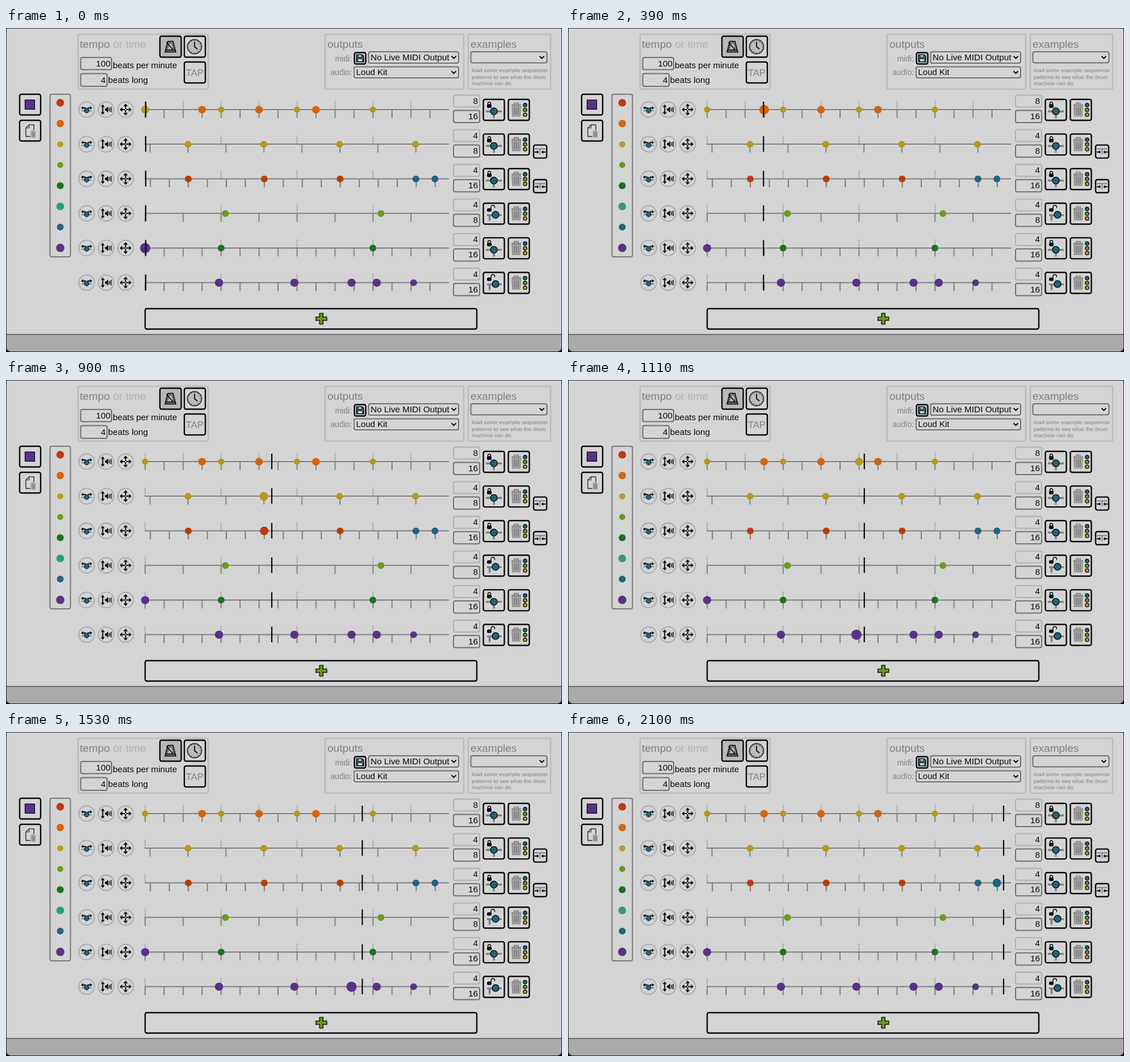
An HTML page for the animation above (2.13 s loop, 979 by 572 pixels).

```html
<!DOCTYPE html>
<html lang="en">
<head>
<meta charset="utf-8">
<title>Drum sequencer</title>
<style>
html, body { margin: 0; width: 100%; height: 100%; overflow: hidden; background: #000; }
svg { display: block; width: 979px; height: 572px; font-family: "Liberation Sans", Arial, sans-serif; }
</style>
</head>
<body>
<svg id="stage" viewBox="0 0 979 572"></svg>
<script>
const BG = '#d4d4d4', GREY = '#808080', PALE = '#b1b1b1', INK = '#080808';
const RED = '#bd3a0f', ORANGE = '#d2650f', YELLOW = '#b8971b', LIME = '#6a9a23',
      GREEN = '#1f6f25', TEAL = '#2a9b80', BLUE = '#1f667f', PURPLE = '#573289';

const LEFT = 245, WIDTH = 535;
const STEP = 30, LOOP = 2130;

const rowY = i => 144 + 61.1 * i;

// beats, divisions, tick offset, locked, notes as [x, colour, radius]
const rows = [
  { beats: 8, div: 16, shift: 0, locked: true, notes: [
    [245, YELLOW, 5.5], [345.3, ORANGE, 6.8], [378.8, YELLOW, 5.5], [445.5, ORANGE, 6.8],
    [512.4, YELLOW, 5.5], [545.7, ORANGE, 6.8], [646, YELLOW, 5.5]] },
  { beats: 4, div: 8, shift: 8.6, locked: true, snap: true, notes: [
    [320.4, YELLOW, 6], [453.9, YELLOW, 6], [587.4, YELLOW, 6], [721, YELLOW, 6]] },
  { beats: 4, div: 16, shift: 9.2, locked: true, snap: true, notes: [
    [321, RED, 6], [454.7, RED, 6], [588.3, RED, 6], [721.8, BLUE, 6], [755.2, BLUE, 6]] },
  { beats: 4, div: 8, shift: 0, locked: false, notes: [[386.4, LIME, 6], [660.2, LIME, 6]] },
  { beats: 4, div: 16, shift: 0, locked: true, notes: [
    [245, PURPLE, 7.2], [378.8, GREEN, 6], [646, GREEN, 6]] },
  { beats: 4, div: 16, shift: 0, locked: false, notes: [
    [375, PURPLE, 7.2], [507.8, PURPLE, 7.2], [608.4, PURPLE, 7.2], [652.8, PURPLE, 7.2], [717.7, PURPLE, 6]] }
];

const line = (x1, y1, x2, y2, color = GREY, w = 2) =>
  `<path d="M${x1} ${y1}L${x2} ${y2}" stroke="${color}" stroke-width="${w}"/>`;
const path = (d, fill = 'none', stroke = 'none', w = 1) =>
  `<path d="${d}" fill="${fill}" stroke="${stroke}" stroke-width="${w}"/>`;
const dot = (x, y, r, fill, stroke = 'none', w = 1) =>
  `<circle cx="${x}" cy="${y}" r="${r}" fill="${fill}" stroke="${stroke}" stroke-width="${w}"/>`;
const box = (x1, y1, x2, y2, stroke, w = 2, r = 3, fill = 'none') =>
  `<rect x="${x1}" y="${y1}" width="${x2 - x1}" height="${y2 - y1}" rx="${r}" fill="${fill}" stroke="${stroke}" stroke-width="${w}"/>`;
const text = (x, y, size, str, fill = INK, anchor = 'start') =>
  `<text x="${x}" y="${y}" font-size="${size}" fill="${fill}" text-anchor="${anchor}">${str}</text>`;
const at = (x, y, body, scale = 1) => `<g transform="translate(${x} ${y}) scale(${scale})">${body}</g>`;
const button = (x1, y1, x2, y2, fill = BG) => box(x1, y1, x2, y2, INK, 2.4, 3, fill);
const chevron = (x, y) => path(`M${x - 4} ${y - 2.3}l4 4 4-4`, 'none', INK, 2);

function trash() {
  return path('M-8.5-8.5h17M-3.5-9v-2.5h7v2.5', 'none', '#888', 2) +
    path('M-7.5-6.5h15l-1 18h-13z', '#aaa', '#888', 1.6) +
    path('M-3.5-4l.4 13M0-4v13M3.5-4l-.4 13', 'none', '#777', 1.7);
}

function slideIcon() {
  return line(-9.5, 2.2, 9.5, 2.2, GREY, 1.8) + dot(0, 1.6, 4.3, BLUE, INK, .9) +
    path('M-10-3l4-3v2h4v2h-4v2zM10-3l-4-3v2h-4v2h4v2z', INK);
}

function volumeIcon() {
  return path('M-6-9l3.5 4.5h-2.5v9h2.5l-3.5 4.5-3.5-4.5h2.5v-9h-2.5z', INK) +
    path('M-2-2h2l3.5-3.5v11l-3.5-3.5h-2z', INK) +
    path('M5.2-3v6M7.3-4v8M9.4-5v10', 'none', INK, 1.1);
}

function moveIcon() {
  const arrow = path('M-1-1v-5h-3l4-4.5 4 4.5h-3v5z', INK);
  return [0, 90, 180, 270].map(a => `<g transform="rotate(${a})">${arrow}</g>`).join('');
}

function lockIcon(locked) {
  if (!locked) {
    return path('M-12 3.2h10M-7.5 3.2v10', 'none', GREY, 3.4) + line(4, 3, 14, 3, GREY, 3) +
      dot(3, 2.5, 6, BLUE, INK, 1.4) +
      box(-12, -9, -4, -3, INK, 0, 2.6, INK) +
      path('M-5-8v-2.5c0-5 6.5-5 6.5 0v1', 'none', INK, 1.5);
  }
  return path('M-14 3.2h28M0 3.2v12', 'none', GREY, 3.4) + dot(0, 3, 6, BLUE, INK, 1.4) +
    path('M-10.5-8v-2.5c0-3.7 5-3.7 5 0v2.5', 'none', INK, 1.5) +
    box(-12, -9.5, -4, -3, INK, 0, 2.6, INK);
}

function snapIcon() {
  return path('M-9-4.5h18M0-4.5v10', 'none', GREY, 2) +
    path('M-2 1l-3.5-3v2h-4v2h4v2zM2 1l3.5-3v2h4v2h-4v2z', INK);
}

function header() {
  const panel = (x1, x2) => box(x1, 11, x2, 108, '#bcbcbc', 2.6, 2);
  const metronome = path('M-4.5-9.5h9l5 19h-19z', '#777', INK, 1.6) +
    path('M-4 4.5l1.5-9h5l1.5 9z', '#bbb') + line(-7, -8, 4, 5, INK, 1.6) + line(-9, 6, 9, 6, INK, 1.5);
  const clock = dot(0, 0, 12.5, '#bbb', '#333', 1.8) + path('M0-8.5v8.5l5 4', 'none', INK, 1.8) +
    [...Array(12)].map((_, i) => `<g transform="rotate(${i * 30})">${line(0, -11.5, 0, -9.5, '#555', 1)}</g>`).join('');
  const floppy = path('M-7-7h11.5l2.5 2.5v11.5h-14z', BLUE, INK, 1.6) +
    path('M-3.8-6.5h7v4h-7zM-4.5 1h9v5.5h-9z', BG, INK, .8);
  return panel(127, 356) + panel(562, 806) + panel(814, 959) +
    text(130, 35, 19, 'tempo', GREY) + text(188.5, 35, 19, 'or time', PALE) +
    button(271, 14.5, 308.5, 51.5, '#b7b7b7') + at(289.5, 33, metronome) +
    button(314, 14.5, 351, 51.5) + at(332, 33, clock) +
    box(314, 60, 351, 97, INK, 2.4, 3) + text(332.3, 84.5, 16.5, 'TAP', GREY, 'middle') +
    box(131.5, 52, 186, 73.5, '#707070') + text(184, 68, 15.3, '100', INK, 'end') +
    text(188, 70.7, 15.2, 'beats per minute') +
    box(131.5, 80.5, 178, 103, '#707070') + text(175.5, 97, 15.3, '4', INK, 'end') +
    text(179.8, 97.4, 15.2, 'beats long') +
    text(566, 35, 19, 'outputs', GREY) + text(609, 59, 14, 'midi:', GREY, 'end') +
    text(609, 83, 13.8, 'audio:', GREY, 'end') +
    button(613.5, 43.5, 633.5, 63.5) + at(623.5, 53.5, floppy, .9) +
    box(638.5, 42, 797, 62, '#707070') + text(642, 56.5, 15.3, 'No Live MIDI Output') + chevron(788.5, 52) +
    box(613, 68.5, 797, 88, '#707070') + text(616.5, 83, 15, 'Loud Kit') + chevron(788.5, 78.5) +
    text(818, 35, 19, 'examples', GREY) + box(818.5, 42, 952.5, 61.5, '#707070') + chevron(943.5, 52) +
    ['load some example sequencer', 'patterns to see what the drum', 'machine can do.']
      .map((s, i) => text(820, 78 + 11.5 * i, 9.85, s, GREY)).join('');
}

function sidebar() {
  const radii = [6.8, 6.6, 5.3, 5.3, 6.2, 6.8, 6, 7.4];
  return button(24, 117, 61, 153.5) + box(33.5, 127, 50.5, 143.5, INK, 1.2, 0, PURPLE) +
    button(24, 163, 61, 199.5) + path('M43 191.5h-8v-15l5.5-5.5h8.500v9', 'none', '#333', 1.5) +
    path('M35 176.500h5.500v-5.500', 'none', '#333', 1.2) + at(48, 187, trash(), .5) +
    box(77.5, 117, 113.5, 404, '#777', 2, 3) +
    [RED, ORANGE, YELLOW, LIME, GREEN, TEAL, BLUE, PURPLE]
      .map((c, i) => dot(95.5, 132 + 36.6 * i, radii[i], c)).join('');
}

function track(row, i) {
  const y = rowY(i);
  let out = [slideIcon, volumeIcon, moveIcon].map((icon, k) =>
    at(142 + 34.3 * k, y, dot(0, 0, 13.7, 'none', '#a7a7a7', 1.8) + icon())).join('');
  for (let b = 0; b < row.beats; b++) {
    const x = LEFT + b * WIDTH / row.beats;
    out += line(x, y - 15.5, x, y, PALE);
  }
  for (let d = 0; d < row.div; d++) {
    const x = LEFT + row.shift + d * WIDTH / row.div;
    out += line(x, y, x, y + 15);
  }
  out += line(LEFT - 1, y, LEFT + WIDTH, y);
  out += box(788, y - 25.5, 834, y - 4.5, PALE) + text(831, y - 10, 15.3, row.beats, INK, 'end') +
    box(788, y + 1.5, 834, y + 23, '#707070') + text(831, y + 17, 15.3, row.div, INK, 'end') +
    button(840.5, y - 18, 877.5, y + 19) + at(859, y, lockIcon(row.locked)) +
    button(884.5, y - 18, 921.5, y + 19) + at(898.5, y, trash()) +
    [BLUE, LIME, YELLOW].map((c, k) => dot(914, y - 8 + 8.5 * k, 3.2, c, INK, 1.3)).join('');
  if (row.snap) out += button(929, y + 1.5, 952, y + 24.5) + at(940.5, y + 13, snapIcon());
  return out;
}

const stage = document.getElementById('stage');
stage.innerHTML =
  path('M.5.5h978v562q0 9-9 9h-960q-9 0-9-9z', BG) +
  path('M0 541h979v21.500q0 9-9 9h-961q-9 0-9-9z', '#aaa') + line(0, 541, 979, 541, '#222', 1.2) +
  path('M.5.5h978v562q0 9-9 9h-960q-9 0-9-9z', 'none', '#222', 1) +
  header() + sidebar() + rows.map(track).join('') +
  button(245, 495.5, 829, 531.5) +
  at(555.2, 513.3, path('M-3-9.500h6v6.500h6.500v6h-6.500v6.500h-6v-6.500h-6.500v-6h6.500z', LIME, '#17200b', 1.6)) +
  '<g id="notes"></g><path id="heads" stroke="#080808" stroke-width="2.2"/>';

const noteLayer = document.getElementById('notes');
const heads = document.getElementById('heads');
const notes = rows.flatMap((row, i) => row.notes.map(([x, color, r]) => {
  noteLayer.insertAdjacentHTML('beforeend', dot(x, rowY(i) + .2, r, color));
  return { x, r, node: noteLayer.lastChild };
}));

// The playhead drifts slightly around its mean speed.
const pace = [[0, 246], [210, 299], [600, 397], [900, 468], [1320, 575.5], [1770, 686.5], [2100, 767]];

function headAt(t) {
  const k = Math.max(1, pace.findIndex(([time]) => time >= t));
  const [t0, x0] = pace[k - 1], [t1, x1] = pace[k];
  return x0 + (x1 - x0) * (t - t0) / (t1 - t0);
}

function draw(ms) {
  const x = headAt(Math.floor(ms % LOOP / STEP) * STEP);
  heads.setAttribute('d', rows.map((_, i) => `M${x} ${rowY(i) - 14}v27.500`).join(''));
  for (const n of notes) {
    const past = x - n.x;
    n.node.setAttribute('r', past > -14 && past < 20 ? n.r * 1.26 : n.r);
  }
}

const start = performance.now();
function tick() {
  draw(performance.now() - start);
  requestAnimationFrame(tick);
}
tick();
</script>
</body>
</html>
```
